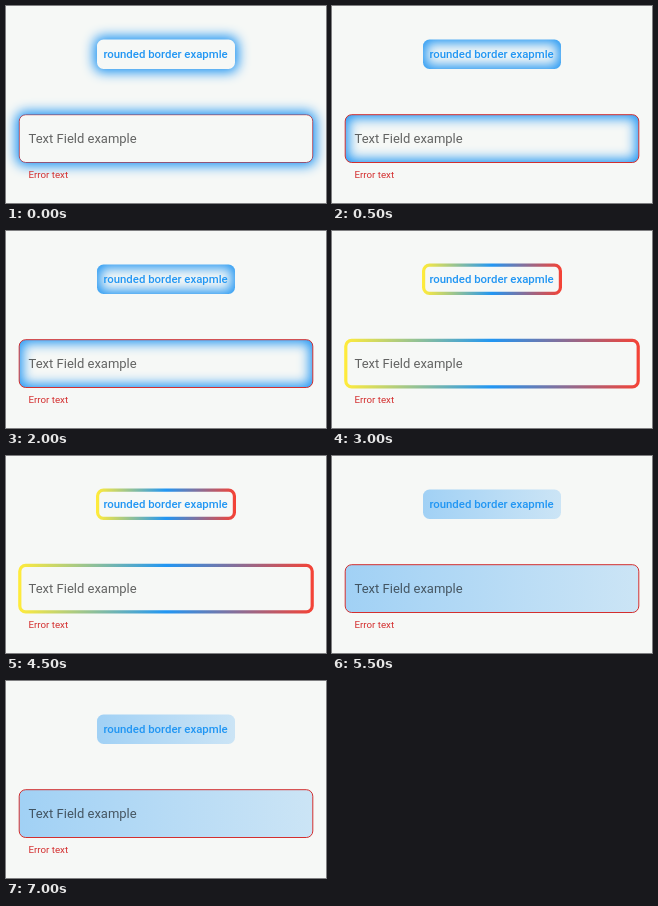
An HTML page with a canvas that plays this animation: 320x197 px, repeating every 8 s.

```html
<!DOCTYPE html>
<html lang="en">
<head>
<meta charset="utf-8">
<title>Border decorations</title>
<style>
html, body { margin: 0; width: 100%; height: 100%; overflow: hidden; background: #f6f8f6; }
canvas { display: block; width: 100vw; height: 100vh; }
</style>
</head>
<body>
<canvas id="stage"></canvas>
<script>
const W = 320, H = 197, LOOP = 8000;
const PAPER = '#f6f8f6', BLUE = '#2196f3', RED = '#d32f2f';
const BLUR = 12, SPREAD = 3.5, FAR = 2000;
const button = { x: 91, y: 33.5, w: 138, h: 29.5, r: 6.5 };
const field = { x: 13.2, y: 108.7, w: 293.6, h: 47.8, r: 6.5 };
const boxes = [button, field];

const canvas = document.getElementById('stage');
const ctx = canvas.getContext('2d');
const scale = window.devicePixelRatio || 1;
canvas.width = W * scale;
canvas.height = H * scale;

// Adds a rounded box, grown by a margin, to a path.
function addBox(path, box, grow = 0, dx = 0) {
  path.roundRect(box.x - grow + dx, box.y - grow, box.w + 2 * grow, box.h + 2 * grow, box.r + grow);
  return path;
}

function boxPath(box, grow) {
  return addBox(new Path2D(), box, grow);
}

function addStage(path, margin, dx = 0) {
  path.rect(dx - margin, -margin, W + 2 * margin, H + 2 * margin);
  return path;
}

// The caster stands off stage, so only its blurred shadow shows.
function castGlow(shape, clip) {
  ctx.save();
  ctx.clip(clip, 'evenodd');
  ctx.shadowColor = BLUE;
  ctx.shadowBlur = BLUR * scale;
  ctx.shadowOffsetX = FAR * scale;
  ctx.fillStyle = BLUE;
  ctx.fill(shape, 'evenodd');
  ctx.restore();
}

function outerGlow(box) {
  castGlow(addBox(new Path2D(), box, SPREAD, -FAR), addBox(addStage(new Path2D(), 0), box));
}

function innerGlow(box) {
  const frame = addStage(new Path2D(), 60, -FAR);
  castGlow(addBox(frame, box, -SPREAD, -FAR), boxPath(box));
}

function across(box, colors) {
  const gradient = ctx.createLinearGradient(box.x, 0, box.x + box.w, 0);
  colors.forEach((color, i) => gradient.addColorStop(i / (colors.length - 1), color));
  return gradient;
}

function rainbowBorder(box) {
  ctx.lineWidth = 3.2;
  ctx.strokeStyle = across(box, ['#ffeb3b', BLUE, '#f44336']);
  ctx.stroke(boxPath(box, -0.6));
}

function tint(box) {
  ctx.fillStyle = across(box, ['rgba(33,150,243,.4)', 'rgba(33,150,243,.2)']);
  ctx.fill(boxPath(box));
}

function errorBorder() {
  ctx.lineWidth = 1;
  ctx.strokeStyle = RED;
  ctx.stroke(boxPath(field, 0));
}

function label(text, x, y, font, color) {
  ctx.font = font + ' Roboto, sans-serif';
  ctx.fillStyle = color;
  ctx.fillText(text, x, y);
}

const styles = [
  { until: 500, draw() { errorBorder(); boxes.forEach(outerGlow); } },
  { until: 3000, draw() { boxes.forEach(innerGlow); errorBorder(); } },
  { until: 5500, draw() { boxes.forEach(rainbowBorder); } },
  { until: LOOP, draw() { boxes.forEach(tint); errorBorder(); } }
];

function render(now) {
  const time = now % LOOP;
  ctx.setTransform(scale, 0, 0, scale, 0, 0);
  ctx.fillStyle = PAPER;
  ctx.fillRect(0, 0, W, H);
  styles.find(style => time < style.until).draw();
  label('rounded border exapmle', 97.4, 52.2, '500 11.4px', BLUE);
  label('Text Field example', 22.6, 136.7, '400 13px', 'rgba(0,0,0,.6)');
  label('Error text', 22.4, 172.1, '400 9.75px', RED);
  requestAnimationFrame(loop);
}

const start = performance.now();
function loop() {
  render(performance.now() - start);
}
loop();
</script>
</body>
</html>
```
